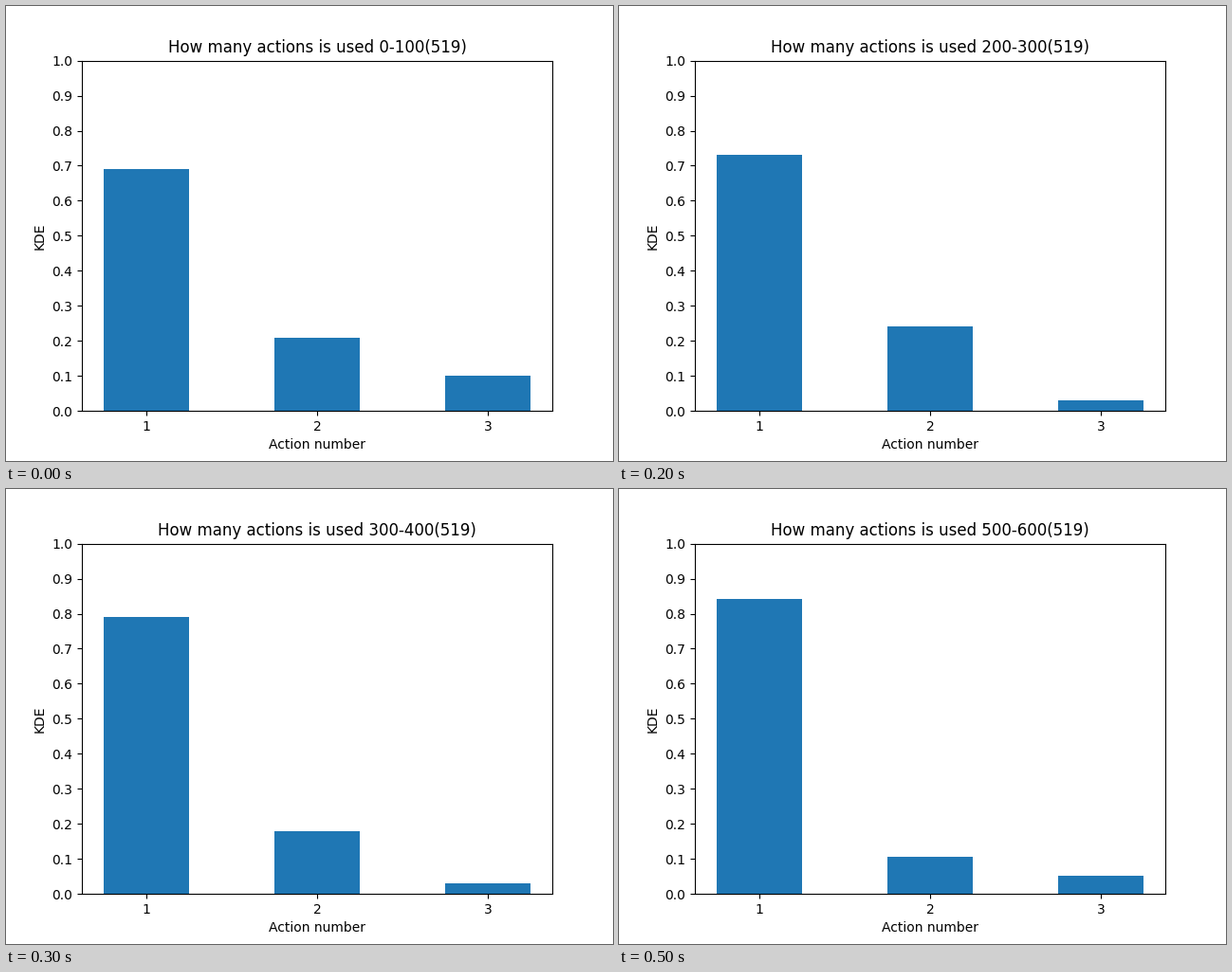
A matplotlib script for the animation above (0.6 s loop, 640 by 480 pixels).

```python
import matplotlib.pyplot as plt
import numpy as np
from matplotlib.animation import FuncAnimation

WINDOW = 100
TOTAL = 519
BAR_WIDTH = 0.5
ACTIONS = np.arange(1, 4)

# Uses of the first two actions per window; the third takes the remainder.
FIRST = (69, 68, 73, 79, 71, 16)
SECOND = (21, 27, 24, 18, 22, 2)


def shares(index):
    size = min(WINDOW, TOTAL - index * WINDOW)
    first, second = FIRST[index], SECOND[index]
    return np.array([first, second, size - first - second]) / size


plt.rcParams["font.family"] = "DejaVu Sans"
fig, ax = plt.subplots(figsize=(6.4, 4.8), dpi=100)
bars = ax.bar(ACTIONS, shares(0), width=BAR_WIDTH, color="tab:blue")
ax.set(xlabel="Action number", ylabel="KDE", xticks=ACTIONS,
       yticks=np.linspace(0, 1, 11), ylim=(0, 1))
title = ax.set_title("")


def update(index):
    start = index * WINDOW
    title.set_text(f"How many actions is used {start}-{start + WINDOW}({TOTAL})")
    for bar, share in zip(bars, shares(index)):
        bar.set_height(share)
    return [title, *bars]


animation = FuncAnimation(fig, update, frames=len(FIRST), interval=100,
                          repeat=True, repeat_delay=0, blit=False)
plt.show()
```
